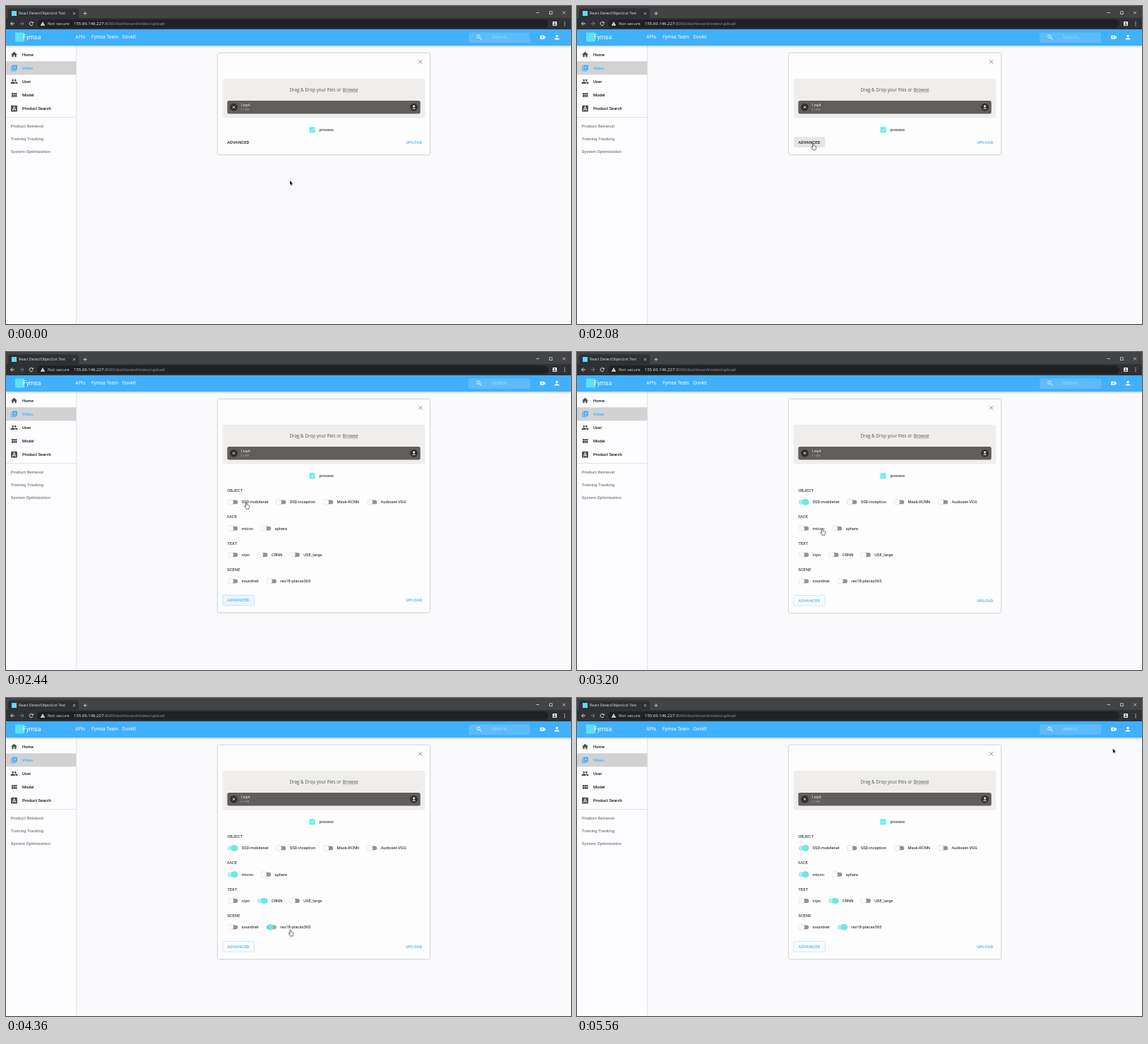
Animation, 800 px wide and 450 px high, one loop 5.68 s. Source, as an HTML page:

```html
<!DOCTYPE html>
<html lang="en">
<head>
<meta charset="utf-8">
<title>Video upload</title>
<style>
  html, body { margin: 0; width: 100%; height: 100%; overflow: hidden; background: #faf9fb; }
  svg { display: block; width: 100vw; height: 100vh; }
  text { font-family: Roboto, sans-serif; white-space: pre; }
  .ui { font-family: "Open Sans", "Noto Sans", sans-serif; }
  .medium { font-weight: 500; }
  .line { fill: none; stroke-width: 1; }
  #card { filter: drop-shadow(0 .6px .9px rgba(0,0,0,.4)); }
  .knob { filter: drop-shadow(0 .4px .5px rgba(0,0,0,.4)); }
  #bar { filter: drop-shadow(0 1px 1.5px rgba(0,0,0,.25)); }
</style>
</head>
<body>
<svg id="stage" viewBox="0 0 800 450"></svg>
<script>
const BLUE = '#40b0ff', CYAN = '#62efe8', INK = '#161616';
const LOOP = 5680, STEP = 40, GROWTH = 159;

const text = (x, cy, str, size, fill = INK, more = '') =>
  `<text x="${x}" y="${cy + size * .36}" font-size="${size}" fill="${fill}" ${more}>${str}</text>`;
const rect = (x, y, w, h, fill, r = 0, more = '') =>
  `<rect x="${x}" y="${y}" width="${w}" height="${h}" rx="${r}" fill="${fill}" ${more}/>`;
const circle = (x, y, r, fill, more = '') =>
  `<circle cx="${x}" cy="${y}" r="${r}" fill="${fill}" ${more}/>`;
const line = (d, stroke, width = 1) =>
  `<path class="line" d="${d}" stroke="${stroke}" style="stroke-width:${width}"/>`;
const cross = (x, y, r, stroke, width) =>
  line(`M${x - r} ${y - r}L${x + r} ${y + r}M${x + r} ${y - r}L${x - r} ${y + r}`, stroke, width);
// Icons are drawn on a 24-unit grid and placed by their centre.
const icon = (x, y, d, fill, size = 10) =>
  `<path transform="translate(${x - size / 2} ${y - size / 2}) scale(${size / 24})" d="${d}" fill="${fill}" fill-rule="evenodd"/>`;

const ICONS = {
  home: 'M10 20v-6h4v6h5v-8h3L12 3 2 12h3v8z',
  video: 'M4 6H2v14q0 2 2 2h14v-2H4zM8 2h12q2 0 2 2v12q0 2-2 2H8q-2 0-2-2V4q0-2 2-2zm4 12.5 6-4.5-6-4.5z',
  people: 'M16 11a3 3 0 1 0 0-6 3 3 0 0 0 0 6zM8 11a3 3 0 1 0 0-6 3 3 0 0 0 0 6zm0 2c-2.3 0-7 1.2-7 3.5V19h14v-2.5C15 14.2 10.300 13 8 13zm8 0-1 .1c1.200.8 2 2 2 3.400V19h6v-2.500c0-2.300-4.700-3.500-7-3.500z',
  grid: 'M4 5h5v6H4zm6 0h5v6h-5zm6 0h5v6h-5zM4 12h5v6H4zm6 0h5v6h-5zm6 0h5v6h-5z',
  letter: 'M4 2h16q2 0 2 2v16q0 2-2 2H4q-2 0-2-2V4q0-2 2-2zm7 3L5.900 18.500H8l1.100-3h5.800l1.100 3h2.100L13 5zM9.900 13.500 12 7.700l2.100 5.800z',
  person: 'M12 12a4 4 0 1 0 0-8 4 4 0 0 0 0 8zm0 2c-2.700 0-8 1.300-8 4v2h16v-2c0-2.700-5.300-4-8-4z',
  camera: 'M4 6h12q1 0 1 1v3.500l4-4v11l-4-4V17q0 1-1 1H4q-1 0-1-1V7q0-1 1-1zM9 8v3H6v2h3v3h2v-3h3v-2h-3V8z',
  warning: 'M1 21h22L12 2zm10-11h2v5h-2zm0 6.500h2v2h-2z',
  badge: 'M5 3h14q2 0 2 2v14q0 2-2 2H5q-2 0-2-2V5q0-2 2-2zm7 3a3 3 0 1 0 0 6 3 3 0 0 0 0-6zM6 18h12v-1c0-2-4-3-6-3s-6 1-6 3z'
};

function browser() {
  const ui = 'class="ui"', white = '#f1f1f1';
  return rect(0, 0, 800, 18, '#424345') + rect(0, 17, 800, 16, '#303134') +
    rect(3, 3.5, 100, 16, '#303134', 3) +
    rect(8, 7, 7, 7, '#5fd8f5') +
    text(18, 10.5, 'React DetectObjectList Test', 5.24, '#e4e4e4', ui) +
    cross(96.500, 10.500, 1.600, '#ddd', .7) +
    line('M109.500 10.500h5M112 8v5', '#ddd', .8) +
    line('M750.500 9.500h4.500M769.500 7.700h3.800v3.800h-3.800z', '#eee', .7) +
    cross(790, 9.500, 2, '#eee', .7) +
    rect(44, 19, 724, 12, '#202124', 6) +
    line('M12 25H6.700M9.200 22.300L6.500 25l2.700 2.700', '#eee', .9) +
    line('M19.500 25h5M22.300 22.300L25 25l-2.700 2.700', '#85878a', .9) +
    line('M38 26a2.500 2.500 0 1 1-.4-2.600', '#eee', .9) +
    `<path d="M38.700 22v2.500h-2.500z" fill="#eee"/>` +
    icon(52, 25, ICONS.warning, '#e8e8e8', 7) +
    text(59, 25, 'Not secure', 6.1, '#dedede', ui) +
    text(96, 25, '155.69.146.227<tspan fill="#9a9da1">:8000/dashboard/video/upload</tspan>', 5.98, white, ui) +
    icon(777, 25, ICONS.badge, '#eee', 8) +
    [22.6, 25, 27.4].map(y => circle(791, y, .7, '#eee')).join('');
}

function appBar() {
  return rect(0, 33, 800, 23, BLUE, 0, 'id="bar"') +
    rect(13, 37.5, 13, 13, '#5fe0f5') +
    text(24, 44.3, 'Fymsa', 8.6, '#fff') +
    text(98.3, 44, 'APIs', 6.67, '#f4faff') +
    text(121, 44, 'Fymsa Team', 6.67, '#f4faff') +
    text(164.8, 44, 'Dovkit', 6.8, '#f4faff') +
    rect(655, 37.5, 87, 14.5, '#5dbcff', 1.7) +
    circle(669, 43.2, 2.2, 'none', 'stroke="#fff" stroke-width=".9"') +
    line('M670.600 44.800l3 3', '#fff', 1) +
    text(688, 44, 'Search...', 6.5, '#a3d8ff') +
    icon(760, 44.2, ICONS.camera, '#fff') + icon(780, 44.2, ICONS.person, '#fff');
}

function sidebar() {
  const items = [['Home', 'home'], ['Video', 'video'], ['User', 'people'], ['Model', 'grid'], ['Product Search', 'letter']];
  const groups = ['Product Retrieval', 'Training Tracking', 'System Optimization'];
  return rect(0, 56, 99.5, 394, '#fdfcfe') + rect(99.2, 56, .8, 394, '#dcdcdc') +
    rect(0, 78.3, 99.5, 19, '#d2d2d3') + rect(0, 157.3, 99.5, .7, '#dadada') +
    items.map(([name, key], i) => {
      const y = 68.7 + i * 19.1, on = i === 1;
      return icon(11.5, y, ICONS[key], on ? BLUE : '#4b4b4b', 10.5) +
        text(23, y, name, 5.95, on ? BLUE : INK, 'class="medium"');
    }).join('') +
    groups.map((name, i) => text(6.8, 170.2 + i * 17.9, name, 6, '#7b7b7c', 'class="medium"')).join('');
}

// Each switch: label, label x, and the time it is turned on.
const SECTIONS = [
  ['OBJECT', ['SSD-mobilenet', 333.5, 2600], ['SSD-inception', 401.7], ['Mask-RCNN', 468.5], ['Audioset-VGG', 530.5]],
  ['FACE', ['mtcnn', 333.5, 3240], ['sphere', 380.5]],
  ['TEXT', ['ctpn', 333.5], ['CRNN', 375.7, 3560], ['USE_large', 421.2]],
  ['SCENE', ['soundnet', 333.5], ['res18-places365', 388.3, 4320]]
];
const switches = [];

function toggle(label, x, y, at) {
  const i = at ? switches.push({ x: x - 15.5, at }) - 1 : -1;
  const id = part => at ? `id="${part}${i}"` : '';
  return rect(x - 19.3, y - 2.9, 14, 5.8, '#939393', 2.9) +
    (at ? rect(x - 19.3, y - 2.9, 14, 5.8, '#a9f3ee', 2.9, id('track')) : '') +
    circle(x - 15.5, y, 4.1, '#fafafa', `class="knob" ${id('knob')}`) +
    text(x, y, label, 5.83);
}

function options() {
  return SECTIONS.map(([title, ...list], i) => {
    const y = 196 + i * 37.3;
    return text(313.2, y, title, 5.95) +
      list.map(([label, x, at]) => toggle(label, x, y + 16.4, at)).join('');
  }).join('');
}

function dialog() {
  const spaced = 'class="medium" letter-spacing=".16"';
  return rect(300, 67, 300, 143, '#fefdfe', 2, 'id="card"') +
    cross(586.7, 79, 2.6, '#757575', .8) +
    rect(306.700, 102.700, 286.600, 56, '#efeeec', 2.500) +
    text(401.5, 118.5, 'Drag &amp; Drop your files or', 6.3, '#555', 'class="ui"') +
    text(476.8, 118.5, 'Browse', 6.3, '#555', 'class="ui"') +
    rect(476.8, 121.7, 21.6, .5, '#888') +
    rect(313.3, 134, 273.4, 18.5, '#615d5c', 2.5) +
    circle(322.5, 143.2, 5.3, '#302e2e') + cross(322.5, 143.2, 1.5, '#fff', 1) +
    circle(577.5, 143.2, 5.3, '#302e2e') +
    line('M577.500 144.500v-3M575.300 145.300h4.400', '#fff', .9) +
    '<path d="M577.500 139.900l2.200 2.500h-4.400z" fill="#fff"/>' +
    text(332, 140.5, '1.mp4', 4.6, '#fff', 'class="ui"') +
    text(332, 146.3, '3.1 MB', 3.75, '#b5b3b2', 'class="ui"') +
    rect(429.5, 171.3, 8, 8, CYAN, .9) +
    line('M431.200 175.400l1.600 1.600 3.200-3.300', '#fff', .9) +
    text(443.5, 175.3, 'process', 5.8) +
    `<clipPath id="fold"><rect id="foldBox" x="300" y="186" width="300" height="0"/></clipPath>
     <g clip-path="url(#fold)">${options()}</g>
     <g id="footer">` +
    rect(306.9, 185.3, 44.3, 14.8, '#e5e5e6', 1.7, 'id="hover"') +
    rect(306.9, 185.3, 44.5, 14.8, '#eaf6ff', 1.7, 'id="tint"') +
    rect(306.9, 185.3, 44.5, 14.8, 'none', 1.7, `id="outline" stroke="#9fd7ff" stroke-width=".6"`) +
    text(313.2, 192.7, 'ADVANCED', 5.83, INK, `id="advanced" ${spaced}`) +
    text(566.3, 192.7, 'UPLOAD', 5.83, BLUE, spaced) + '</g>';
}

const pointers = `<g id="pointer">
  <path id="arrow" d="M0 0V6.200L1.400 4.900 2.400 7.200 3.500 6.700 2.500 4.500H4.400Z" fill="#000" stroke="#fff" stroke-width=".3"/>
  <path id="hand" d="M-.8.700Q0-.300.700.700V3.200Q1.500 2.700 2 3.500 2.800 3.100 3.200 3.900 4.200 3.600 4.200 4.600V6.600Q4.200 7.700 3.500 8.300V9.200H-.4V8.500L-2.700 5.600Q-2.600 4.500-1.500 4.900L-.8 5.700Z"
    fill="#fff" stroke="#111" stroke-width=".6" stroke-linejoin="round"/></g>`;

const stage = document.getElementById('stage');
stage.innerHTML = rect(0, 33, 800, 417, '#faf9fb') + sidebar() + appBar() + browser() + dialog() + pointers;
const $ = id => document.getElementById(id);
const set = (id, name, value) => $(id).setAttribute(name, value);

// Pointer stops: time, x, y
const PATH = [
  [0, 402, 247], [160, 390, 241], [400, 355, 227], [600, 344, 222], [680, 342.5, 220.5],
  [880, 341, 220.5], [1040, 340.5, 221], [1280, 338, 221], [1600, 338, 220.5],
  [1760, 336.5, 206], [1960, 334.5, 196], [2080, 334.3, 194.5], [2240, 334.3, 195],
  [2440, 340.3, 213], [2800, 340.3, 213.5], [3120, 346.5, 249], [3200, 347.3, 250], [3240, 347.3, 250],
  [3400, 374, 280], [3480, 380, 285.5], [3640, 380.5, 286], [3840, 395, 314], [4000, 402.5, 327.5],
  [4800, 403, 328], [4920, 428, 308], [5080, 545, 225], [5240, 690, 122],
  [5360, 754, 84], [5440, 756.5, 76], [5560, 758.7, 71.5], [LOOP, 758.7, 71.5]
];

const clamp = v => Math.min(1, Math.max(0, v));
const span = (t, start, length) => clamp((t - start) / length);

// Material's standard curve, cubic-bezier(.4, 0, .2, 1), solved by bisection.
function ease(p) {
  let low = 0, high = 1;
  for (let i = 0; i < 20; i++) {
    const u = (low + high) / 2, v = 1 - u;
    1.2 * v * v * u + .6 * v * u * u + u * u * u < p ? low = u : high = u;
  }
  return p >= 1 ? 1 : low * low * (3 - 2 * low);
}

function pointerAt(t) {
  const i = PATH.findIndex(stop => stop[0] > t);
  const [t0, x0, y0] = PATH[i - 1], [t1, x1, y1] = PATH[i];
  const p = (t - t0) / (t1 - t0);
  return [x0 + (x1 - x0) * p, y0 + (y1 - y0) * p];
}

function render(t) {
  const open = t >= 2160, grown = GROWTH * ease(span(t, 2160, 300));
  set('card', 'height', 143 + grown);
  set('foldBox', 'height', grown);
  set('footer', 'transform', `translate(0 ${grown})`);
  set('hover', 'opacity', open ? 0 : ease(span(t, 1840, 200)));
  set('tint', 'opacity', open ? 1 - span(t, 2440, 200) : 0);
  set('outline', 'opacity', open ? 1 : 0);
  set('advanced', 'fill', open ? BLUE : INK);

  switches.forEach(({ x, at }, i) => {
    const p = ease(span(t, at, 150));
    set('knob' + i, 'cx', x + 5.5 * p);
    set('knob' + i, 'fill', t > at ? CYAN : '#fafafa');
    set('track' + i, 'opacity', p);
  });

  const hand = t >= 1840 && t < 4880;
  set('pointer', 'transform', `translate(${pointerAt(t)})`);
  set('hand', 'opacity', hand ? 1 : 0);
  set('arrow', 'opacity', hand ? 0 : 1);
}

const begin = performance.now();
function tick() {
  const t = (performance.now() - begin) % LOOP;
  render(Math.floor(t / STEP) * STEP);
  requestAnimationFrame(tick);
}
tick();
</script>
</body>
</html>
```
